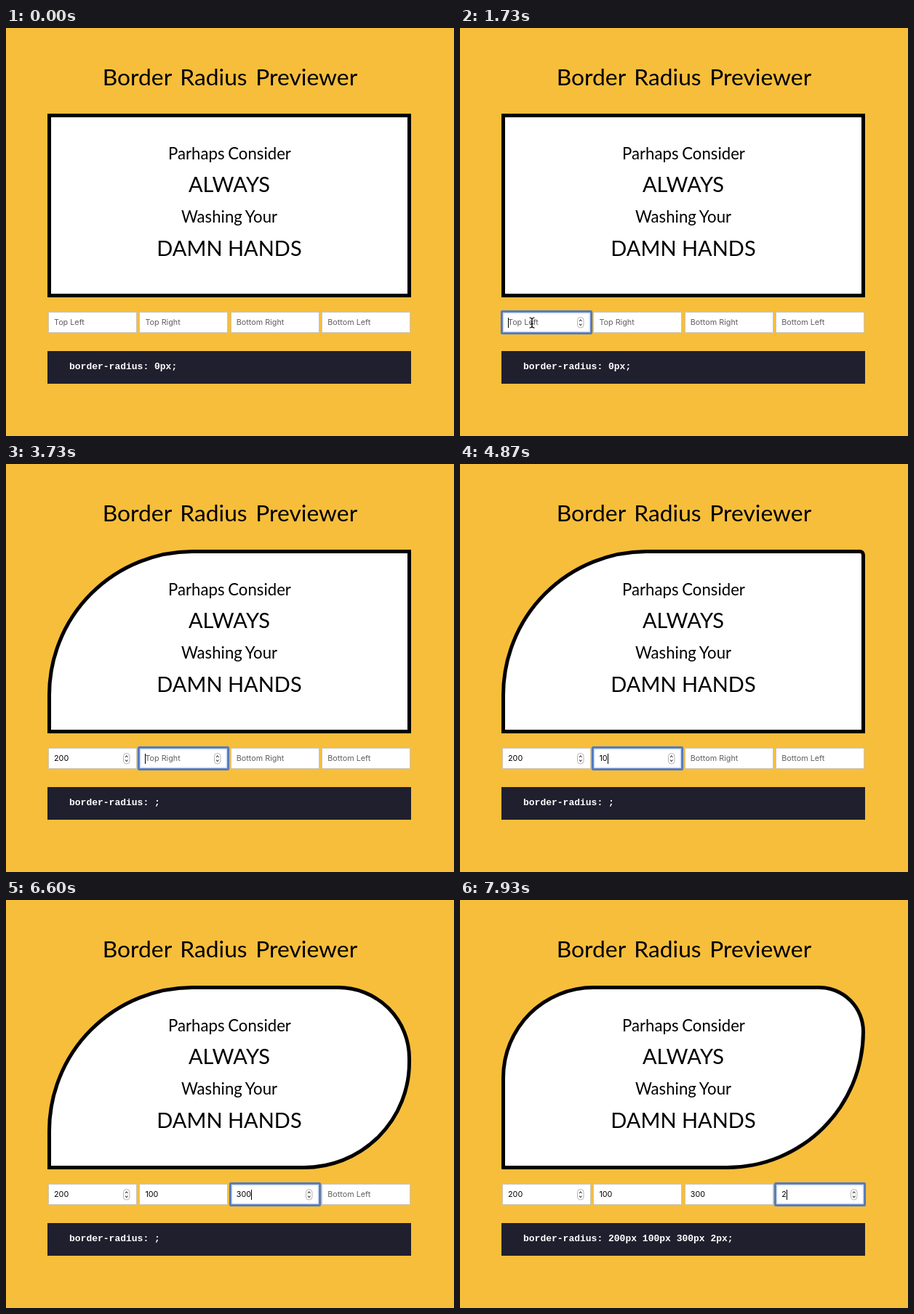
Write an HTML page that moves like this. It is 616x562 px and loops after 8 s.

```html
<!DOCTYPE html>
<html lang="en">
<head>
<meta charset="utf-8">
<title>Border Radius Previewer</title>
<style>
  html, body { margin: 0; width: 100%; height: 100%; overflow: hidden; background: #f7be3b; }
  .stage { position: relative; width: 616px; height: 562px; overflow: hidden; }
  .stage > * { position: absolute; }

  .preview {
    left: 57px; top: 118px; width: 500px; height: 253px; box-sizing: border-box;
    border: 5px solid #000; background: #fff;
    animation: top-left 8s infinite, top-right 8s infinite,
      bottom-right 8s infinite, bottom-left 8s infinite;
  }
  @keyframes top-left {
    0%, 30.625% { border-top-left-radius: 0; }
    35.625% { border-top-left-radius: 2px; }
    38.19% { border-top-left-radius: 15px; }
    44.44%, 100% { border-top-left-radius: 200px; }
  }
  @keyframes top-right {
    0%, 56.875% { border-top-right-radius: 0; }
    59.375% { border-top-right-radius: 1px; }
    61.875% { border-top-right-radius: 8px; }
    68.125%, 100% { border-top-right-radius: 100px; }
  }
  @keyframes bottom-right {
    0%, 75.625% { border-bottom-right-radius: 0; }
    78.5% { border-bottom-right-radius: 3px; }
    80.825% { border-bottom-right-radius: 21px; }
    87.075%, 100% { border-bottom-right-radius: 300px; }
  }
  @keyframes bottom-left {
    0%, 95.625% { border-bottom-left-radius: 0; }
    100% { border-bottom-left-radius: 2px; }
  }

  .lettering { left: 0; top: 0; font-family: Lato, sans-serif; text-anchor: middle; }
  .title { font-size: 31.8px; word-spacing: 3.5px; }
  .small { font-size: 22.2px; word-spacing: -1px; }
  .large { font-size: 29px; }

  .field {
    top: 391px; width: 122px; height: 29px; box-sizing: border-box;
    border: 1px solid #c9c5bb; background: #fff; padding-left: 7px;
    font: 10.8px/28px Inter, sans-serif; color: #000; white-space: pre;
  }
  .field.empty .label { color: #606060; }
  .field.focused {
    border-color: #6488cc; border-radius: 1px;
    box-shadow: 0 0 0 2px #5379b8, 0 0 1px 2px #6b83a0, inset 0 0 2px 1px #bdd0f4;
  }
  .caret { position: absolute; top: 7px; width: 1px; height: 14px; background: #000; }
  .field.empty .caret { left: 7px; }
  .spinner { position: absolute; left: 102px; top: 6px; }

  .output {
    left: 57px; top: 445px; width: 470px; height: 45px; padding-left: 30px;
    background: #201f2e; color: #fff; white-space: pre;
    font: bold 13px/43px "Liberation Mono", monospace;
  }

  .pointer { left: 0; top: 0; overflow: visible; animation: travel 8s infinite; }
  .arrow { animation: arrow 8s step-end infinite; }
  .beam { animation: beam 8s step-end infinite; }
  @keyframes travel {
    0%, .875% { transform: translate(484px, 430px); animation-timing-function: ease-in; }
    4.7% { transform: translate(180px, 424px); animation-timing-function: ease-out; }
    6.625%, 100% { transform: translate(99px, 406px); }
  }
  @keyframes arrow { 0% { opacity: 0; } .875% { opacity: 1; } 4.9%, 100% { opacity: 0; } }
  @keyframes beam { 0% { opacity: 0; } 4.9% { opacity: 1; } 30.625%, 100% { opacity: 0; } }
</style>
</head>
<body>
<div class="stage">
  <div class="preview"></div>
  <svg class="lettering" width="616" height="562">
    <text class="title" x="308" y="78.5">Border Radius Previewer</text>
    <text class="small" x="307.5" y="181">Parhaps Consider</text>
    <text class="large" x="307" y="226">ALWAYS</text>
    <text class="small" x="307" y="268">Washing Your</text>
    <text class="large" x="307" y="313.5">DAMN HANDS</text>
  </svg>
  <div class="output"></div>
  <svg class="pointer" width="1" height="1">
    <path class="arrow" d="M0 0V15L3.5 11.8 6 17.3 8.5 16.2 6.2 11H11Z" stroke="#fff"/>
    <path class="beam" d="M-3.5 -7Q0 -7 0 -4Q0 -7 3.5 -7M0 -4V4M-3.5 7Q0 7 0 4Q0 7 3.5 7M-2 1.5H2"
      fill="none" stroke="#000" stroke-width="1.2"/>
  </svg>
</div>
<script>
  const LOOP = 8000, BLINK = 500, HOVER = 390;
  const fields = [
    { label: 'Top Left', value: '200', focus: 1300, keys: [2450, 2850, 3055] },
    { label: 'Top Right', value: '100', focus: 3600, keys: [4550, 4750, 4950] },
    { label: 'Bottom Right', value: '300', focus: 5700, keys: [6050, 6280, 6466] },
    { label: 'Bottom Left', value: '2', focus: 7100, keys: [7650] }
  ];
  const stage = document.querySelector('.stage');
  const output = document.querySelector('.output');
  const pointer = document.querySelector('.pointer');

  fields.forEach((field, i) => {
    const box = document.createElement('div');
    box.className = 'field';
    box.style.left = 58 + 125.4 * i + 'px';
    box.innerHTML = `<span class="label"></span><span class="caret"></span>
      <svg class="spinner" width="10" height="16" fill="none">
        <rect x=".5" y=".5" width="8.5" height="14.5" rx="4" fill="#fff" stroke="#b5b5b5"/>
        <path d="M3 6L4.75 3.8 6.5 6M3 9.5L4.75 11.7 6.5 9.5" stroke="#444" stroke-width="1.1"/>
      </svg>`;
    stage.insertBefore(box, pointer);
    field.box = box;
    for (const part of ['label', 'caret', 'spinner']) {
      field[part + 'El'] = box.querySelector('.' + part);
    }
  });

  const show = (el, on) => { el.style.visibility = on ? 'visible' : 'hidden'; };

  function render(time) {
    const typed = fields.map((field, i) => {
      const pressed = field.keys.filter(key => key <= time);
      const text = field.value.slice(0, pressed.length);
      const end = i < 3 ? fields[i + 1].focus : LOOP;
      const focused = time >= field.focus && time < end;
      const lastInput = Math.max(field.focus, ...pressed);

      field.labelEl.textContent = text || field.label;
      field.box.classList.toggle('empty', !text);
      field.box.classList.toggle('focused', focused);
      show(field.caretEl, focused && Math.floor((time - lastInput) / BLINK) % 2 === 0);
      show(field.spinnerEl, focused || (i === 0 && time >= HOVER));
      return text;
    });

    let radius = '0px';
    if (typed.every(Boolean)) radius = typed.map(text => text + 'px').join(' ');
    else if (typed.some(Boolean)) radius = '';
    output.textContent = `border-radius: ${radius};`;
  }

  const start = performance.now();
  function tick() {
    render((performance.now() - start) % LOOP);
    requestAnimationFrame(tick);
  }
  tick();
</script>
</body>
</html>
```
